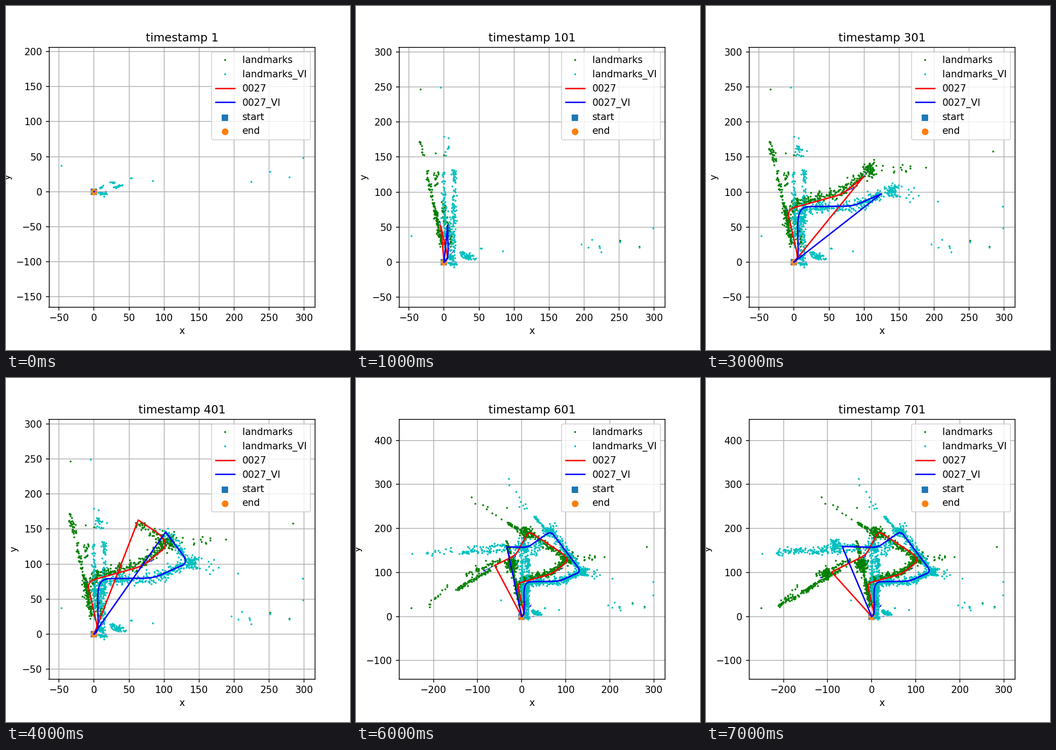
A matplotlib script for the animation above (8000 ms loop, 748x748 px).

```python
import matplotlib.pyplot as plt
import numpy as np
from matplotlib.animation import FuncAnimation

SIZE = 748
STEPS = 8
SAMPLES = 600
ARROW_PX = 30

# Share of the whole drive done at each step
PROGRESS = [0, 0.12, 0.275, 0.43, 0.563, 0.723, 0.928, 1]
# Shares at which the heading is marked with an arrow
POSES = [0.01, 0.095, 0.135, 0.34, 0.43, 0.67, 0.76, 0.925, 1]

RED_CORNERS = [(0, 0), (6, 5), (-10, 75), (69, 97), (105, 126), (96, 141),
               (16, 194), (-13, 140), (-91, 101)]
BLUE_CORNERS = [(0, 0), (6, 5), (5, 62), (11, 79), (85, 80), (135, 102),
                (66, 194), (14, 157), (-67, 159)]

rng = np.random.default_rng(27)


def toward(a, b, radius):
    """Point on the way from a to b, at most half way."""
    d = b - a
    return a + d * min(0.5, radius / np.hypot(*d))


def rounded(corners, radius=12):
    """Polyline with rounded corners, sampled evenly by distance."""
    c = np.array(corners, float)
    u = np.linspace(0, 1, 12)[:, None]
    parts = [c[:1]]
    for a, b, d in zip(c, c[1:], c[2:]):
        p, q = toward(b, a, radius), toward(b, d, radius)
        parts.append((1 - u) ** 2 * p + 2 * u * (1 - u) * b + u ** 2 * q)
    pts = np.vstack(parts + [c[-1:]])
    dist = np.r_[0, np.cumsum(np.hypot(*np.diff(pts, axis=0).T))]
    even = np.linspace(0, dist[-1], SAMPLES + 1)
    return np.column_stack([np.interp(even, dist, axis) for axis in pts.T])


def headings(track):
    d = np.gradient(track, axis=0)
    return d / np.hypot(*d.T)[:, None]


class Cloud:
    """Landmarks, each group visible from its step on."""

    def __init__(self):
        self.groups = []

    def dots(self, step, *pts):
        self.groups.append((step, np.array(pts, float)))

    def ray(self, step, start, end, spread, n):
        u = rng.random((n, 1))
        pts = np.array(start) * (1 - u) + np.array(end) * u
        self.dots(step, *(pts + rng.normal(size=(n, 2)) * spread))

    def clump(self, step, centre, spread, n):
        self.ray(step, centre, centre, spread, n)

    def roadside(self, step, track, side, n):
        """Points beside the stretch driven in this step."""
        share = rng.uniform(PROGRESS[step - 1], PROGRESS[step], n)
        i = (share * SAMPLES).astype(int)
        left = headings(track)[i] @ np.array([[0, 1], [-1, 0]])
        self.dots(step, *(track[i] + side * left
                          + rng.normal(size=(n, 2)) * 4))

    def at(self, step):
        seen = [pts for first, pts in self.groups if first <= step]
        return np.vstack([np.empty((0, 2))] + seen).T


red = rounded(RED_CORNERS)
blue = rounded(BLUE_CORNERS)
green, cyan = Cloud(), Cloud()

# Near and far sights from the start
cyan.dots(0, (-47, 37.5), (84, 15.5), (224, 14.5), (251, 29), (279, 21),
          (298.5, 48.5), (52, 19.5), (53.5, 19.5), (14, -7))
cyan.ray(0, (7, -2.5), (17, -2.5), 1, 18)
cyan.ray(0, (9, 5.5), (12, 7), 0.7, 8)
cyan.ray(0, (22, 13), (29, 13), 0.4, 8)
cyan.ray(0, (28, 5), (40, 10), 0.8, 13)
cyan.dots(1, (-5, 249.5))
cyan.ray(1, (177, 22), (228, 26), 5, 6)
cyan.ray(1, (22, 12), (42, 6), 2.2, 32)
cyan.clump(1, (9, 7), 2.5, 30)
green.dots(1, (-34, 247), (-12, 155.5), (0, 153), (251, 31), (279, 22.5))

# Both sides of the first street
cyan.ray(1, (-1, 130), (1, 20), 1.2, 75)
cyan.ray(1, (14, 132), (13, 12), 1.8, 100)
cyan.ray(1, (7, 70), (7, 12), 4, 50)
cyan.ray(1, (3, 180), (8, 150), 3, 8)
green.ray(1, (-34, 175), (-22, 118), 1.5, 14)
green.ray(1, (-24, 120), (-12, 70), 1.3, 40)
green.ray(1, (-13, 75), (-4, 25), 1.6, 95)
green.ray(1, (-11, 132), (-12, 106), 2, 18)
green.ray(1, (-3, 85), (10, 22), 2.5, 65)

# Roadsides up to the far turn
for step, n in ((2, 130), (3, 110), (4, 75), (5, 75)):
    green.roadside(step, red, 4, n)
    cyan.roadside(step, blue, -1, n + 20)
cyan.ray(2, (4, 168), (10, 150), 3, 15)
green.ray(2, (-35, 165), (-28, 140), 2.5, 22)
cyan.clump(3, (140, 103), 5, 75)
cyan.ray(3, (150, 100), (178, 95), 6, 10)
cyan.dots(3, (205, 86.5), (298, 79))
green.clump(3, (108, 131), 5, 70)
green.ray(3, (120, 136), (162, 132), 5, 12)
green.dots(3, (188, 135), (284, 158))

# Sights beyond the top turn
cyan.dots(5, (-29, 313), (-28, 298))
cyan.ray(5, (-10, 285), (10, 242), 3, 7)
cyan.ray(5, (26, 229), (52, 202), 1.6, 32)
cyan.clump(5, (62, 195), 6, 60)
cyan.ray(5, (26, 145), (48, 175), 7, 30)
cyan.ray(5, (5, 175), (7, 95), 6, 60)
green.dots(5, (-114, 271), (-106, 257))
green.ray(5, (-85, 254), (-45, 218), 2, 6)
green.ray(5, (-34, 214), (0, 193), 1.6, 38)
green.clump(5, (10, 192), 6, 65)
green.clump(5, (-25, 116), (7, 11), 55)

# The way back west
cyan.dots(6, (-249, 142.5))
cyan.ray(6, (-216, 142), (-150, 152), 4, 14)
cyan.ray(6, (-140, 145), (-30, 152), 2.2, 65)
cyan.ray(6, (-120, 154), (-38, 162), 3, 34)
cyan.clump(6, (2, 157), (10, 8), 60)
green.dots(6, (-251, 19.5))
green.ray(6, (-217, 25), (-165, 68), 3, 14)
green.ray(6, (-148, 61), (-72, 107), 2.5, 70)
green.ray(6, (-130, 95), (-40, 130), 3.5, 50)
green.clump(6, (-24, 122), 5.5, 85)
cyan.clump(7, (-83, 163), (5, 6), 75)
cyan.ray(7, (-215, 150), (-100, 151), 4, 60)
green.clump(7, (-103, 97), 6, 80)
green.ray(7, (-212, 25), (-140, 65), 2.3, 60)

fig, ax = plt.subplots(figsize=(5, 5), dpi=SIZE / 5)
fig.subplots_adjust(left=0.125, right=0.899, bottom=0.125, top=0.88)


def draw_track(track, colour, label, step):
    """The drive so far, closed by a line back to the origin."""
    done = track[:int(PROGRESS[step] * SAMPLES) + 1]
    ax.plot(*np.vstack([done, [(0.05, 0.1)]]).T, colour, label=label)


def draw_arrows(step):
    i = [int(s * SAMPLES) for s in POSES if s <= PROGRESS[step]]
    tails = np.vstack([[(0, 0)], red[i]])
    ways = np.vstack([[(1, 0)], headings(red)[i]])
    ax.quiver(*tails.T, *ways.T, color="b", units="dots", width=1.2,
              scale=1 / ARROW_PX, scale_units="dots")


def draw(step):
    ax.clear()
    ax.plot(*green.at(step), "g.", ms=2, label="landmarks")
    ax.plot(*cyan.at(step), "c.", ms=2, label="landmarks_VI")
    draw_track(red, "r", "0027", step)
    draw_track(blue, "b", "0027_VI", step)
    ax.scatter(0, 0, marker="s", label="start")
    ax.scatter(0, 0, marker="o", label="end")
    draw_arrows(step)
    ax.axis("equal")
    ax.set_xlabel("x")
    ax.set_ylabel("y")
    ax.set_title(f"timestamp {step * 100 + 1}")
    ax.grid(True)
    ax.legend(loc="upper right")
    return []


anim = FuncAnimation(fig, draw, frames=STEPS, init_func=lambda: draw(0),
                     interval=1000, repeat=True, repeat_delay=0)
plt.show()
```
